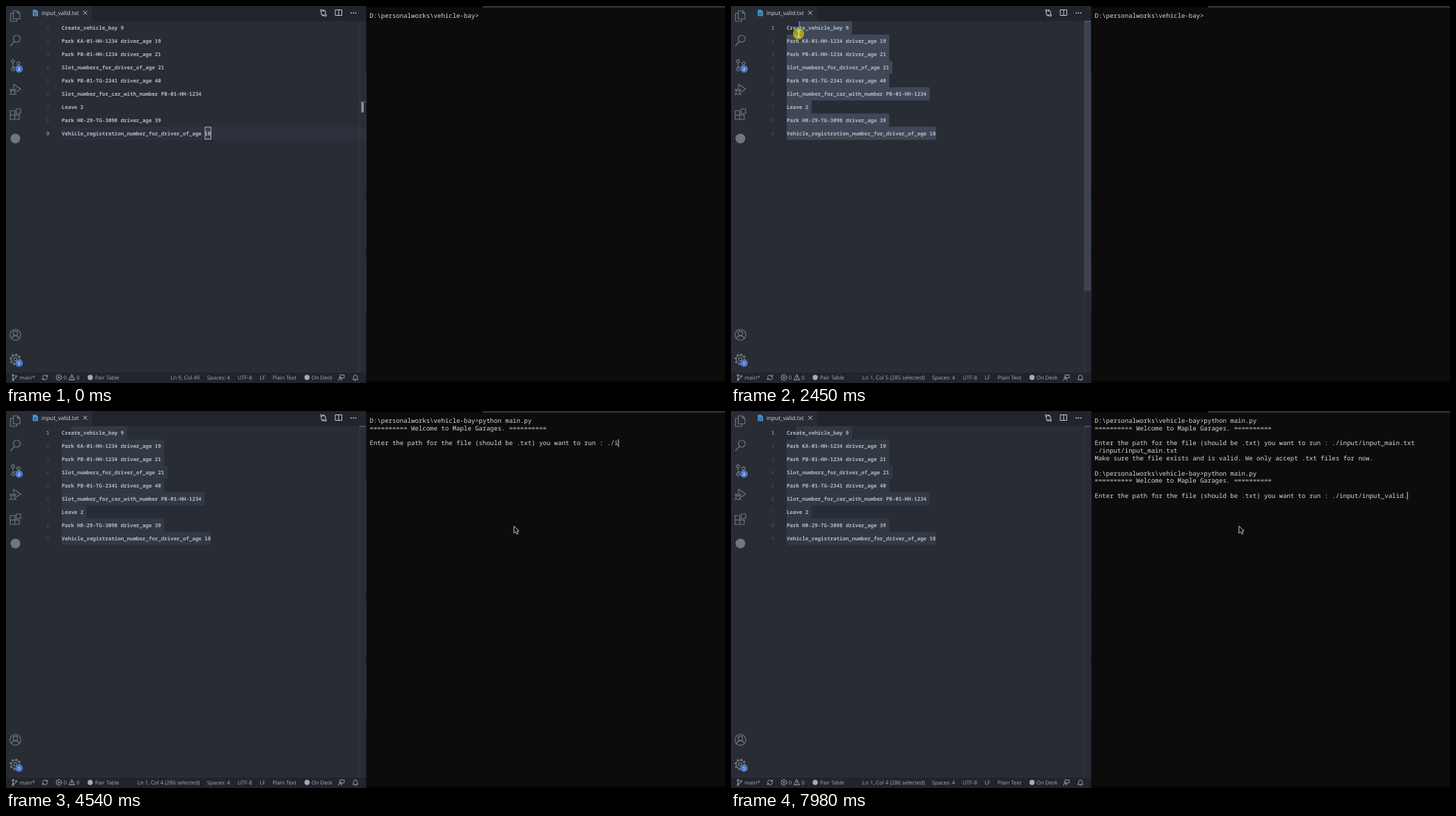
An HTML page that plays this animation: 1033 by 542 pixels, repeating every 8000 ms.

```html
<!DOCTYPE html>
<html lang="en">
<head>
<meta charset="utf-8">
<title>Editor and terminal</title>
<style>
  html, body { margin: 0; width: 100%; height: 100%; overflow: hidden; background: #282c34; }
  svg { display: block; width: 1033px; height: 542px; }
  text { white-space: pre; text-rendering: geometricPrecision; }
  .code { font: 700 7.45px "Noto Sans Mono", monospace; fill: #b4bac6; }
  .num { font: 500 7.45px "Noto Sans Mono", monospace; text-anchor: end; }
  .term { font: 500 9.02px "Noto Sans Mono", monospace; fill: #dadada; }
  .ui { font: 7.65px "Open Sans", sans-serif; fill: #a4abb8; }
  .wide { font-size: 7.8px; }
  .tab { font: 8.2px "Open Sans", sans-serif; fill: #d7dae0; }
  .badge { font: 600 6px "Open Sans", sans-serif; fill: #f8fafd; text-anchor: middle; }
  .icon { fill: none; stroke: #70757f; stroke-width: 1.2; stroke-linejoin: round; stroke-linecap: round; }
  .top { stroke: #c8cad0; stroke-width: 1; }
  .small { stroke: #a4abb8; stroke-width: .9; }
</style>
</head>
<body>
<svg viewBox="0 0 1033 542" xmlns="http://www.w3.org/2000/svg">
  <rect width="518" height="542" fill="#282c34"/>
  <rect x="28" width="490" height="21.5" fill="#21252b"/>
  <rect x="28" width="95.5" height="21.5" fill="#282c34"/>
  <rect y="527" width="518" height="15" fill="#21252b"/>

  <!-- activity bar -->
  <g class="icon">
    <path d="M10.5 7h6l3.5 3.5v8h-9.5zM16.5 7v3.5h3.5M10.5 10.5H6.5v11.5h9v-3.5"/>
    <circle cx="15.5" cy="47" r="5"/><path d="M12 51l-5.5 6"/>
    <circle cx="10" cy="79.5" r="2.2"/><circle cx="10" cy="91" r="2.2"/><circle cx="18" cy="82.5" r="2.2"/>
    <path d="M10 81.7v7M18 84.7q0 3-8 3"/>
    <path d="M11 118v-5.5l10 6.8-6 4.2"/><ellipse cx="10" cy="123.5" rx="3" ry="3.8"/>
    <path d="M7 122h6M5.5 119.5l2 1.5M14.5 119.5l-2 1.5M5.5 127.5l2-1.5M14.5 127.5l-2-1.5"/>
    <path d="M6 150.5h6.5v12.5H6zM6 156.7h13v6.3H6M14.5 148h6.5v6.5h-6.5z"/>
    <circle cx="13.5" cy="472.8" r="7.8"/><circle cx="13.5" cy="470.5" r="3.2"/><path d="M8 478.2q1-4 5.5-4t5.5 4"/>
    <circle cx="13.3" cy="508" r="5.8"/><circle cx="13.3" cy="508" r="2.3"/>
    <circle cx="13.3" cy="508" r="7.2" stroke-width="2.2" stroke-dasharray="2.8 2.855" stroke-linecap="butt"/>
  </g>
  <circle cx="13.5" cy="190.5" r="7" fill="#70757f"/>
  <circle cx="18.8" cy="90.5" r="5.3" fill="#4d78cc"/><text class="badge" x="18.8" y="92.7">2</text>
  <circle cx="18.8" cy="513.5" r="5.3" fill="#4d78cc"/><text class="badge" x="18.8" y="515.7">1</text>

  <!-- tab row -->
  <path d="M38.5 5.5h5l2.5 2.5v6.5h-7.5z" fill="#4c97d6"/>
  <path d="M40 9.3h4.5M40 11h4.5M40 12.7h4.5" stroke="#24415c" stroke-width=".7"/>
  <text class="tab" x="51" y="13.2">input_valid.txt</text>
  <g class="icon top">
    <path d="M111.3 7.3l5 5M116.3 7.3l-5 5"/>
    <circle cx="453" cy="6.5" r="1.4"/><circle cx="459" cy="13.5" r="1.4"/>
    <path d="M453 8v4q0 1.5 2 1.5h1.5M455.2 12l1.5 1.5-1.5 1.5M459 12V8q0-1.5-2-1.5h-1.5M456.8 5l-1.5 1.5 1.5 1.5"/>
    <path d="M473.5 5.5h9v8h-9zM478 5.5v8"/>
  </g>
  <g fill="#c8cad0"><circle cx="496" cy="10" r=".9"/><circle cx="499.3" cy="10" r=".9"/><circle cx="502.6" cy="10" r=".9"/></g>

  <!-- editor -->
  <rect id="current" x="80" y="173.8" width="437" height="18.9" fill="#2c313b"/>
  <g id="selection"></g>
  <g id="code"></g>
  <rect id="word" x="286" y="174" width="8.5" height="17.5" fill="#ffffff10" stroke="#b9bdc6" stroke-width=".9"/>
  <rect id="caret" width="1.2" height="18.9" fill="#528bff"/>
  <path d="M508 22v505" stroke="#3a3e47" stroke-width=".8"/>
  <rect id="slider" x="507.5" y="22" width="9.5" height="388" fill="#3d434e"/>
  <rect id="wordMark" x="510.5" y="138.5" width="3.5" height="14.5" fill="#8c919b"/>
  <rect id="mark" x="508" width="9" height="1.1" fill="#4b6fb5"/>

  <!-- status bar -->
  <g class="icon small">
    <circle cx="10" cy="530.8" r="1.2"/><circle cx="10" cy="537.5" r="1.2"/><circle cx="14.5" cy="532.3" r="1.2"/>
    <path d="M10 532v4.3M14.5 533.5q0 2-4.5 2.3"/>
    <path d="M52.5 533.5a3.6 3.6 0 0 1 6.8-1M59.5 534.5a3.6 3.6 0 0 1-6.8 1M59.8 530.8l-.4 2-2-.3M52.2 537.4l.4-2 2 .3"/>
    <circle cx="76" cy="534" r="4"/><path d="M74.4 532.4l3.2 3.2M77.6 532.4l-3.2 3.2"/>
    <path d="M94.7 530l4 7.5h-8zM94.7 532.5v2.5M94.7 536.3v.2"/>
    <path d="M479.5 530.5h6.5v4h-2l-1.5 1.5v-1.5"/><circle cx="480" cy="533.8" r="1.3"/><path d="M477.5 538.2q0-2.5 2.5-2.5t2.5 2.5"/>
    <path d="M498.5 536.7q1-1 1-3.5a2.5 2.7 0 0 1 5 0q0 2.5 1 3.5zM501 538h2"/>
  </g>
  <g fill="#a4abb8"><circle cx="121" cy="534" r="3.7"/><circle cx="432.5" cy="534" r="3.7"/></g>
  <g class="ui">
    <text x="19.5" y="536.8">main*</text><text x="82.8" y="536.8">0</text><text x="101.2" y="536.8">0</text>
    <text x="128" y="536.8">Pair Table</text>
    <text id="position" class="wide" x="278.3" y="536.8" text-anchor="end"></text>
    <text x="288.8" y="536.8">Spaces: 4</text><text x="333" y="536.8">UTF-8</text><text x="364.5" y="536.8">LF</text>
    <text x="383" y="536.8">Plain Text</text><text x="439" y="536.8">On Deck</text>
  </g>

  <!-- terminal -->
  <rect x="517.5" width="515.5" height="542" fill="#0c0c0c"/>
  <rect x="518" width="167" height="2" fill="#000"/>
  <rect x="685" width="348" height="2.5" fill="#333"/>
  <rect x="518" y="539" width="515" height="3" fill="#050505"/>
  <path d="M517.3 97v167M517.3 275v76M517.3 363v78" stroke="#363a42" stroke-width=".8"/>
  <g id="term"></g>
  <rect id="termCaret" width="1" height="11" fill="#e4e4e4"/>

  <!-- pointer -->
  <g id="mouse">
    <circle id="glow" r="8" fill="#e6dc00" fill-opacity=".62"/>
    <path id="beam" d="M-2-4.5h1.3l.7.6.7-.6H2M-2 4.5h1.3l.7-.6.7.6H2M0-4v8" fill="none" stroke="#f2f2e6"/>
    <path id="arrow" d="M.3.4v10.3l2.4-2 1.7 3.3 1.9-.9-1.6-3.2 3-.4z" fill="#0f0f0f" stroke="#d4d4d4" stroke-width=".9"/>
  </g>
</svg>
<script>
const LOOP = 8000, LEFT = 80, TOP = 22, CHAR = 4.47, ROW = 18.94;
const TERM_X = 522.5, TERM_CHAR = 5.412, TERM_ROW = 10.8;
const PRESS = 1150, RELEASE = 2600, SWITCH = 3350;

const code = [
  "Create_vehicle_bay 9",
  "Park KA-01-HH-1234 driver_age 19",
  "Park PB-01-HH-1234 driver_age 21",
  "Slot_numbers_for_driver_of_age 21",
  "Park PB-01-TG-2341 driver_age 40",
  "Slot_number_for_car_with_number PB-01-HH-1234",
  "Leave 2",
  "Park HR-29-TG-3098 driver_age 39",
  "Vehicle_registration_number_for_driver_of_age 18"
];
const last = code.length - 1;

// time, x, y
const path = [
  [20, 918, 532], [250, 800, 420], [550, 530, 235], [750, 430, 192],
  [1050, 302, 185], [1250, 297, 184], [1550, 253, 155], [1650, 222, 101],
  [1950, 150, 70], [2250, 108, 44], [2450, 97, 40], [2550, 94, 40], [2650, 94, 40],
  [2950, 420, 62], [3250, 670, 82], [3450, 696, 86], [3650, 702, 87],
  [3750, 704.8, 88], [3950, 722, 140], [4150, 729.5, 165]
];

const $ = id => document.getElementById(id);
const make = (parent, tag, attrs) => {
  const el = document.createElementNS("http://www.w3.org/2000/svg", tag);
  for (const k in attrs) el.setAttribute(k, attrs[k]);
  return $(parent).appendChild(el);
};
const show = (el, on) => el.setAttribute("visibility", on ? "visible" : "hidden");
const place = (id, x, y) => { $(id).setAttribute("x", x); $(id).setAttribute("y", y); };
const clamp = (v, lo, hi) => Math.max(lo, Math.min(hi, v));

const bars = code.map((s, i) =>
  make("selection", "rect", { y: TOP + i * ROW, height: ROW + .1, rx: 1.5 }));
const numbers = code.map((s, i) => {
  const y = TOP + 12.2 + i * ROW;
  make("code", "text", { class: "code", x: LEFT, y }).textContent = s;
  const n = make("code", "text", { class: "num", x: 62.3, y });
  n.textContent = i + 1;
  return n;
});
const rows = Array.from({ length: 11 }, (_, i) =>
  make("term", "text", { class: "term", x: TERM_X, y: 17 + i * TERM_ROW }));

function pointer(t) {
  let i = path.findIndex(p => p[0] > t);
  if (i < 0) return path[path.length - 1].slice(1);
  i = Math.max(i, 1);
  const [a, b] = [path[i - 1], path[i]];
  const k = clamp((t - a[0]) / (b[0] - a[0]), 0, 1);
  return [a[1] + (b[1] - a[1]) * k, a[2] + (b[2] - a[2]) * k];
}

function typed(s, from, to, t) {
  if (t < from) return "";
  return s.slice(0, 1 + Math.floor((t - from) / (to - from) * (s.length - 1) + 1e-6));
}

function screen(t) {
  const prompt = "D:\\personalworks\\vehicle-bay>";
  const run = "python main.py";
  const hello = "========== Welcome to Maple Garages. ==========";
  const ask = "Enter the path for the file (should be .txt) you want to run : ";
  const out = [prompt + (t >= 4050 ? run : "")];
  if (t >= 4300) out.push(hello);
  if (t >= 4400) {
    let file = typed("./input/input_ma", 4450, 5110, t) + typed("in.py", 5210, 5380, t);
    if (t >= 5450) file = file.slice(0, t >= 5510 ? -2 : -1);
    out.push("", ask + file + typed("txt", 5570, 5700, t));
  }
  if (t >= 5800) out.push("./input/input_main.txt",
    "Make sure the file exists and is valid. We only accept .txt files for now.");
  if (t >= 5900) out.push("", prompt + (t >= 6040 ? run : ""));
  if (t >= 6220) out.push(hello);
  if (t >= 6320) out.push("", ask + typed("./i", 6420, 6570, t) + typed("nput", 6670, 6800, t) +
    typed("/input_v", 6880, 7650, t) + typed("alid.", 7750, 7980, t));
  return out;
}

function drawEditor(t, step) {
  const selecting = t >= PRESS;
  const [mx, my] = pointer(Math.min(step, 2550));
  let line = last, col = code[last].length;
  if (selecting) {
    line = clamp(Math.floor((my - TOP) / ROW), 0, last);
    col = clamp(Math.round((mx - LEFT) / CHAR), 0, code[line].length);
  }
  const count = code.slice(line).join("\n").length - col;

  bars.forEach((bar, i) => {
    const from = i === line ? col : 0;
    const to = code[i].length + (i < last ? 1 : 0);
    show(bar, selecting && i >= line && count > 0);
    bar.setAttribute("x", LEFT + from * CHAR);
    bar.setAttribute("width", Math.max(0, to - from) * CHAR);
    bar.setAttribute("fill", t < SWITCH ? "#404857" : "#333943");
    numbers[i].setAttribute("fill", i === line ? "#c0c5cf" : "#495162");
  });
  const plain = !selecting || !count;
  show($("current"), plain);
  show($("word"), !selecting);
  show($("wordMark"), !selecting);
  show($("caret"), selecting && t < SWITCH);
  place("caret", LEFT + col * CHAR - .4, TOP + line * ROW);
  $("mark").setAttribute("y", TOP - .5 + line * 14.5);
  show($("slider"), t >= 750 && t < 3050);
  $("position").textContent = `Ln ${line + 1}, Col ${col + 1}` + (plain ? "" : ` (${count} selected)`);
}

function drawTerminal(t) {
  const out = screen(t);
  rows.forEach((row, i) => {
    const s = out[i] || "";
    if (row.textContent !== s) row.textContent = s;
  });
  const end = out.length - 1;
  place("termCaret", TERM_X + out[end].length * TERM_CHAR - .3, 8.3 + end * TERM_ROW);
  show($("termCaret"), t >= SWITCH);
}

function drawMouse(t, step) {
  const [x, y] = pointer(step);
  const inEditor = x < 508 && y > TOP && y < 527;
  $("mouse").setAttribute("transform", `translate(${x} ${y})`);
  show($("beam"), t >= 20 && inEditor);
  show($("arrow"), t >= 20 && !inEditor);
  show($("glow"), (t >= PRESS && t < RELEASE) || (t >= SWITCH && t < SWITCH + 150));
}

function draw(t) {
  // the pointer is sampled ten times a second
  const step = Math.floor((t + 50) / 100) * 100 - 50;
  drawEditor(t, step);
  drawTerminal(t);
  drawMouse(t, step);
}

function tick() {
  draw(performance.now() % LOOP);
  requestAnimationFrame(tick);
}
tick();
</script>
</body>
</html>
```
